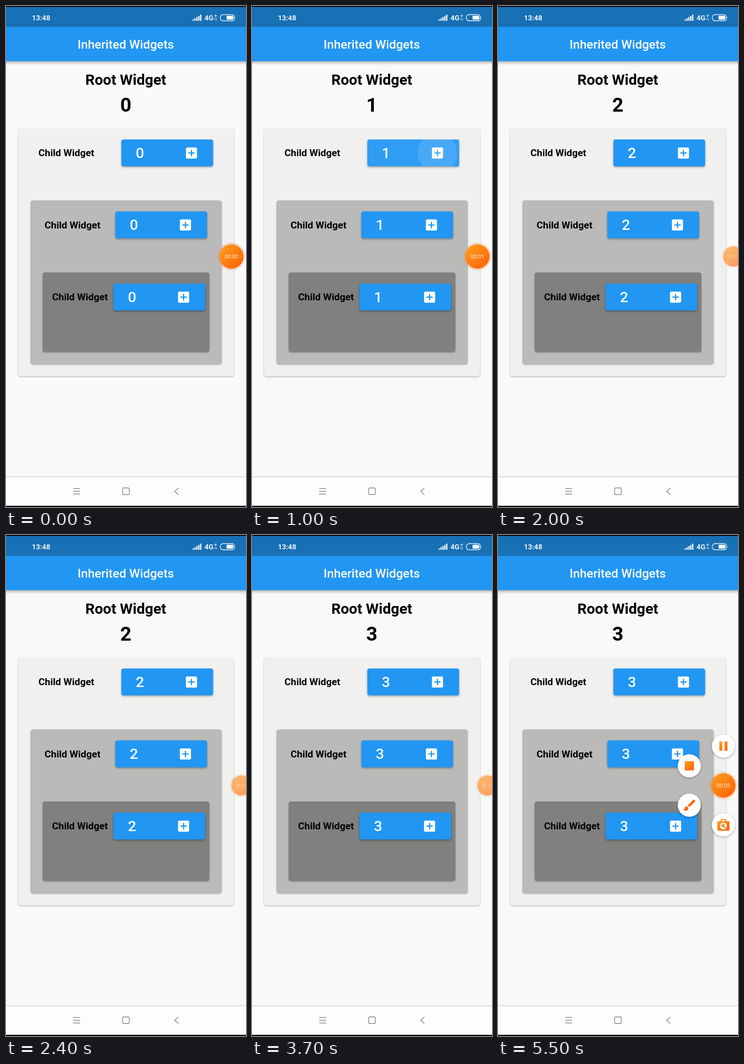
Write an HTML page with a canvas that moves like this. It is 518 px wide and 1081 px high and loops after 5.8 s.

```html
<!DOCTYPE html>
<html lang="en">
<head>
<meta charset="utf-8">
<title>Inherited Widgets</title>
<style>
html, body { margin: 0; width: 100%; height: 100%; overflow: hidden; background: #f9faf7; }
canvas { display: block; width: 518px; height: 1081px; }
</style>
</head>
<body>
<canvas id="stage"></canvas>
<script>
const W = 518, H = 1081, LOOP = 5800, STEP = 100;
const BLUE = '#2196f3', FONT = 'Roboto, sans-serif';
const canvas = document.getElementById('stage');
const ctx = canvas.getContext('2d');
const dpr = window.devicePixelRatio || 1;
canvas.width = W * dpr;
canvas.height = H * dpr;

const PRESSES = [900, 2000, 3100];
const SECONDS = [1000, 2100, 3100, 4200, 5400];
const MENU_START = 4700;
const BRUSH = new Path2D('M7 14c-1.66 0-3 1.34-3 3 0 1.31-1.16 2-2 2 .92 1.22 2.49 2 4 2 2.21 0 4-1.79 4-4 0-1.66-1.34-3-3-3z' +
  'm13.71-9.37l-1.34-1.34c-.39-.39-1.02-.39-1.41 0L9 12.25 11.75 15l8.96-8.96c.39-.39.39-1.02 0-1.41z');

const clamp = v => Math.max(0, Math.min(1, v));
const mix = (a, b, k) => a + (b - a) * k;
const mixColor = (a, b, k) => `rgb(${a.map((v, i) => mix(v, b[i], k)).join()})`;
const passed = (marks, t) => marks.filter(m => t >= m).length;

function rect(x, y, w, h, color) {
  ctx.fillStyle = color;
  ctx.fillRect(x, y, w, h);
}

function roundRect(x, y, w, h, r, color) {
  ctx.beginPath();
  ctx.roundRect(x, y, w, h, r);
  ctx.fillStyle = color;
  ctx.fill();
}

function disc(x, y, r, color) {
  ctx.beginPath();
  ctx.arc(x, y, r, 0, Math.PI * 2);
  ctx.fillStyle = color;
  ctx.fill();
}

function line(points, color, width) {
  ctx.beginPath();
  points.forEach(([x, y]) => ctx.lineTo(x, y));
  ctx.strokeStyle = color;
  ctx.lineWidth = width;
  ctx.stroke();
}

function text(str, x, y, size, weight, color, align = 'center') {
  ctx.font = `${weight} ${size}px ${FONT}`;
  ctx.textAlign = align;
  ctx.fillStyle = color;
  ctx.fillText(str, x, y);
}

function withShadow(alpha, blur, dy, draw) {
  ctx.save();
  ctx.shadowColor = `rgba(0,0,0,${alpha})`;
  ctx.shadowBlur = blur * dpr;
  ctx.shadowOffsetY = dy * dpr;
  draw();
  ctx.restore();
}

function orange(r) {
  const g = ctx.createLinearGradient(-r * 0.7, -r * 0.7, r * 0.7, r * 0.7);
  g.addColorStop(0, '#ff961c');
  g.addColorStop(1, '#ff6809');
  return g;
}

function statusBar() {
  rect(0, 0, W, 46, '#1870b5');
  rect(0, 0, W, 2, '#000');
  text('13:48', 56, 31, 15.3, 700, '#eef5fa', 'left');
  for (let i = 0; i < 5; i++) {
    const h = 3 + i * 2.6;
    roundRect(402.5 + i * 4.1, 32 - h, 2.8, h, 0.8, '#f2f7fb');
  }
  text('4G', 428.5, 31, 15.3, 700, '#eef5fa', 'left');
  line([[449.5, 21], [455.5, 21]], '#e4eff8', 1.2);
  line([[452.5, 18], [452.5, 24]], '#e4eff8', 1.2);
  line([[451, 31], [451, 26], [449.8, 27.5]], '#d5e6f3', 1);
  line([[454, 26], [454, 31], [455.2, 29.5]], '#d5e6f3', 1);
  ctx.beginPath();
  ctx.roundRect(462.3, 18.5, 31.4, 13.6, 6.8);
  ctx.strokeStyle = '#f2f7fb';
  ctx.lineWidth = 1.5;
  ctx.stroke();
  roundRect(476, 21, 15.2, 8.6, [1, 4.3, 4.3, 1], '#fff');
}

function header() {
  withShadow(0.38, 7, 2.5, () => rect(-10, 45, W + 20, 74, BLUE));
  statusBar();
  rect(0, 45, W, 74, BLUE);
  text('Inherited Widgets', 258.5, 92, 26.4, 500, '#fff');
}

function card(x, y, w, h, color) {
  withShadow(0.3, 3, 1.3, () => roundRect(x, y, w, h, 5, color));
}

function addIcon(x, y) {
  ctx.beginPath();
  ctx.roundRect(x - 12, y - 12, 24, 24, 2.7);
  ctx.rect(x - 6.7, y - 1.35, 13.4, 2.7);
  ctx.rect(x - 1.35, y - 6.7, 2.7, 5.35);
  ctx.rect(x - 1.35, y + 1.35, 2.7, 5.35);
  ctx.fillStyle = '#fff';
  ctx.fill('evenodd');
}

function button(x, y, count, since) {
  withShadow(0.35, 4, 2, () => roundRect(x, y, 198, 58, 4.5, BLUE));
  if (since > 0 && since < 400) {
    const grow = clamp(since / 200);
    const fade = clamp((400 - since) / 200);
    ctx.save();
    ctx.beginPath();
    ctx.roundRect(x, y, 198, 58, 4.5);
    ctx.clip();
    rect(x, y, 198, 58, `rgba(255,255,255,${0.125 * grow * fade})`);
    disc(x + 151, y + 29, 170 * grow * grow, `rgba(255,255,255,${0.125 * fade})`);
    ctx.restore();
  }
  text(count, x + 40, y + 40, 32, 500, '#fff');
  addIcon(x + 151.3, y + 29.2);
}

function row(index, labelX, x, y, t, count) {
  text('Child Widget', labelX, y + 36.3, 21.1, 700, '#000', 'left');
  button(x, y, count, t - PRESSES[index]);
}

function navBar() {
  rect(0, 1016, W, 62, '#fdfdfd');
  rect(0, 1015.3, W, 1.2, '#c4c4c4');
  rect(0, 1078.5, W, 2.5, '#000');
  const gray = '#7d7d7d';
  for (const y of [1041, 1047, 1053]) line([[145, y], [160, y]], gray, 1.4);
  ctx.beginPath();
  ctx.roundRect(251.7, 1039.8, 14.4, 14.4, 3);
  ctx.stroke();
  line([[372, 1040], [364, 1047.2], [372, 1054.2]], gray, 1.4);
}

function drawPause() {
  const fill = orange(12);
  rect(-8.8, -10, 6.4, 20, fill);
  rect(2.4, -10, 6.4, 20, fill);
}

function drawStop() {
  roundRect(-10, -10, 20, 20, 1.5, orange(12));
}

function drawBrush() {
  const fill = orange(12);
  ctx.scale(1.36, 1.36);
  ctx.translate(-11.5, -12);
  ctx.fillStyle = fill;
  ctx.fill(BRUSH);
}

function drawToolbox() {
  const fill = orange(13);
  ctx.beginPath();
  ctx.roundRect(-5, -11.3, 10, 8, 1.5);
  ctx.strokeStyle = fill;
  ctx.lineWidth = 2.2;
  ctx.stroke();
  roundRect(-13.2, -8, 26.4, 20.6, 3, fill);
  disc(0, 2.3, 7.4, '#fff');
  line([[-0.5, 1.8], [4.2, 6.5]], '#ff7a12', 2.6);
  disc(-1.4, 0.9, 3.4, '#ff7a12');
  line([[-4.5, -2.2], [-1.6, 0.7]], '#fff', 2);
}

// Each item: direction in degrees, how far out on the opening step, icon
const MENU = [
  [-90, 0.745, drawPause],
  [-150, 0.825, drawStop],
  [150, 0.825, drawBrush],
  [90, 0.745, drawToolbox]
];

function menu(t) {
  const k = clamp((t - MENU_START) / 200);
  const ease = 1 - (1 - k) * (1 - k);
  for (const [deg, from, icon] of MENU) {
    const a = deg * Math.PI / 180;
    const d = 85 * mix(from, 1, ease);
    ctx.save();
    ctx.translate(486.5 + Math.cos(a) * d, 540.5 + Math.sin(a) * d);
    withShadow(0.3, 5, 1.5, () => disc(0, 0, 25, '#fff'));
    icon();
    ctx.restore();
  }
}

function bubble(t) {
  const open = t >= MENU_START;
  const hide = open ? 0 : clamp((t - 1300) / 330);
  const scale = mix(1, 0.83, hide);
  ctx.save();
  ctx.translate(mix(486.5, 508, hide), 540.5);
  ctx.scale(scale, scale);
  ctx.globalAlpha = hide > 0 ? 0.58 : 1;
  disc(0, 0, 30, 'rgba(244,120,70,0.25)');
  disc(0, 0, 26.2, orange(26));
  text('00:0' + passed(SECONDS, t), 0, 4.7, 11.9, 400, '#ffe9d2');
  ctx.restore();
}

function draw(t) {
  const tint = clamp(t / 600);
  const count = passed(PRESSES, t);
  ctx.setTransform(dpr, 0, 0, dpr, 0, 0);
  rect(0, 0, W, H, mixColor([250, 249, 252], [249, 250, 247], tint));
  header();
  text('Root Widget', 258.5, 169.5, 31.7, 700, '#000');
  text(count, 258.5, 227.5, 42.2, 700, '#000');
  card(26, 264, 466, 535, mixColor([241, 240, 241], [240, 241, 239], tint));
  card(53, 419.5, 412.5, 353.5, mixColor([187, 186, 187], [186, 187, 184], tint));
  card(79, 575, 360, 171.5, mixColor([129, 128, 128], [128, 129, 126], tint));
  row(0, 70, 249, 288, t, count);
  row(1, 83.3, 236, 443.3, t, count);
  row(2, 99.5, 232, 599, t, count);
  navBar();
  if (t >= MENU_START) menu(t);
  bubble(t);
}

const start = performance.now();
function tick() {
  const t = (performance.now() - start) % LOOP;
  draw(Math.floor(t / STEP) * STEP);
  requestAnimationFrame(tick);
}
tick();
</script>
</body>
</html>
```
